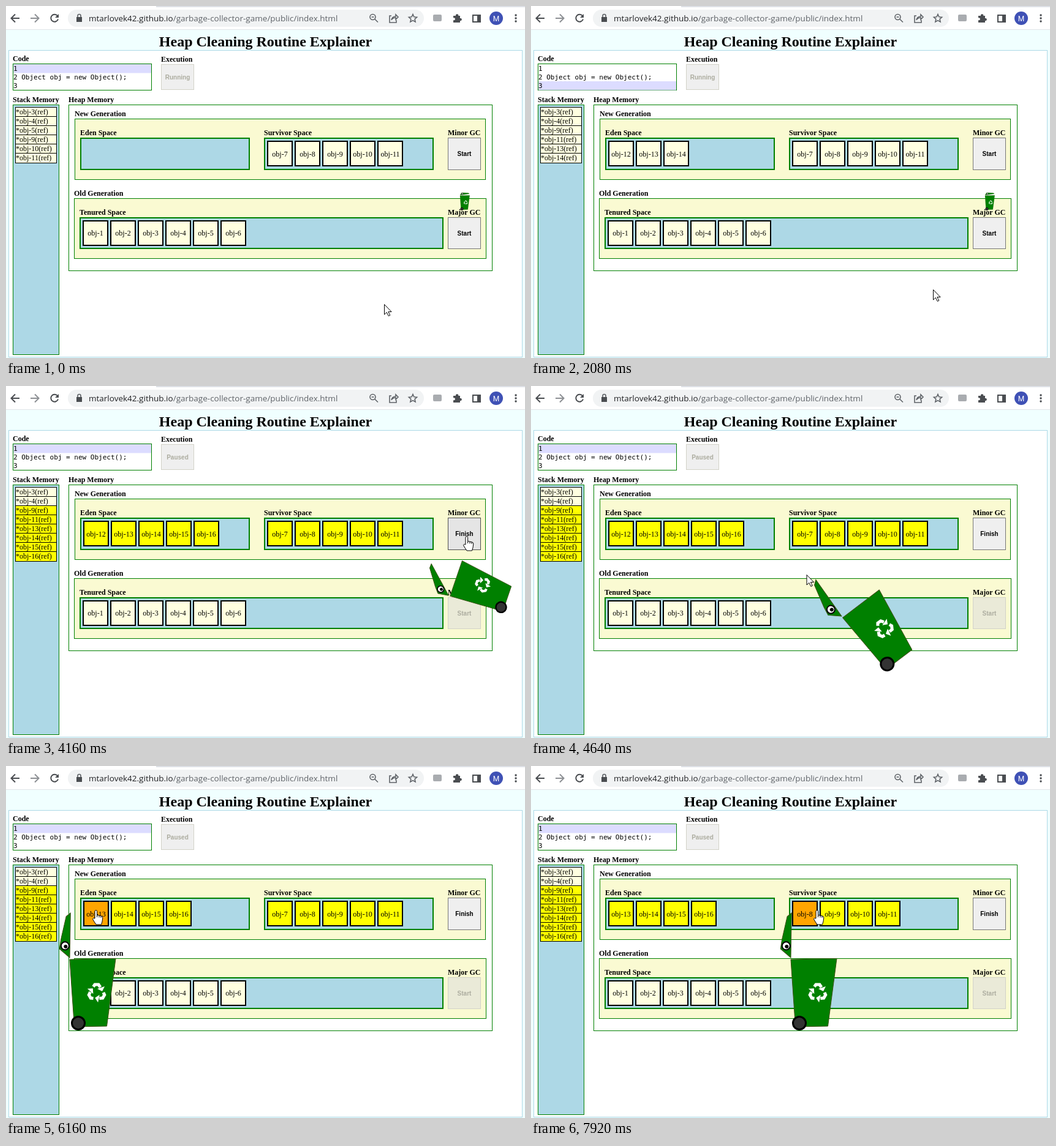
Recreate the animation shown at these times as an HTML page. Size 847 by 575 pixels, loop 8 s.

```html
<!DOCTYPE html>
<html lang="en">
<head>
<meta charset="utf-8">
<title>Heap Cleaning Routine Explainer</title>
<style>
html, body { margin: 0; width: 100%; height: 100%; overflow: hidden; background: #f0ffff; }
svg { display: block; }
text { font: 12px "Liberation Serif", serif; white-space: pre; }
.label { font-weight: bold; }
.title { font-size: 24px; font-weight: bold; text-anchor: middle; }
.code { font: 11px "DejaVu Sans Mono", monospace; }
.button { font: bold 10px "Liberation Sans", sans-serif; text-anchor: middle; }
.url { font: 13.5px "Open Sans", sans-serif; }
.cell { text-anchor: middle; }
.icon { fill: none; stroke: #5f6368; stroke-width: 1.6; }
.nav { fill: none; stroke: #4a4d51; stroke-width: 2; }
.faint { stroke: #8d9094; }
</style>
</head>
<body>
<svg id="stage" width="847" height="575" viewBox="0 0 847 575">
  <g id="page"></g>
  <g id="live"></g>
</svg>
<script>
const LOOP = 8000, STEP = 80;
const FIRST = 130, CYCLE = 815;   // the code loop makes one object per cycle
const PAUSE = 3840;               // minor collection begins
const EATEN = { 12: 5280, 7: 7920 };
const LOST = [5, 10, 12];         // one reference is dropped per cycle
const page = document.getElementById('page'), live = document.getElementById('live');

const clamp = u => Math.max(0, Math.min(1, u));
const smooth = u => (u = clamp(u), u * u * (3 - 2 * u));
const range = (a, b) => Array.from({ length: Math.max(0, b - a + 1) }, (_, i) => a + i);

// Rectangle given by its outer edges, with the border drawn inside
const box = (x, y, x2, y2, fill, line = 'none', w = 1) => {
  const b = line === 'none' ? 0 : w;
  return `<rect x="${x + b / 2}" y="${y + b / 2}" width="${x2 - x - b}" height="${y2 - y - b}" fill="${fill}" stroke="${line}" stroke-width="${b}"/>`;
};
const text = (x, y, s, cls = '', fill = '#000') =>
  `<text x="${x}" y="${y}" class="${cls}" fill="${fill}">${s}</text>`;
const path = (d, attrs = 'class="icon"') => `<path d="${d}" ${attrs}/>`;
const area = (label, x, y, x2, y2, fill, w = 1) =>
  text(x, y - 4, label, 'label') + box(x, y, x2, y2, fill, 'green', w);

function drawPage() {
  page.innerHTML =
    box(0, 0, 847, 38, '#fff') + box(245, 0, 847, 2, '#dee1e6') + box(0, 38, 847, 39, '#e2e5e8') +
    '<rect x="101" y="6" width="581" height="28" rx="14" fill="#f1f3f4"/>' +
    path('M22 20H9M15 13.5L8.5 20L15 26.5', 'class="nav"') +
    path('M40 20H53M47 13.5L53.5 20L47 26.5', 'class="nav faint"') +
    path('M84 16A6 6 0 1 0 85 21.5', 'class="nav"') + path('M86 13V19H80Z', 'fill="#4a4d51"') +
    box(115, 18, 124, 26, '#4a4d51') + path('M117 18V16a2.5 2.5 0 0 1 5 0V18') +
    text(135, 25, 'mtarlovek42.github.io<tspan fill="#5f6368">/garbage-collector-game/public/index.html</tspan>', 'url', '#202124') +
    '<circle class="icon" cx="598.5" cy="18" r="4.5"/>' + path('M602 21.5L607 26.5M596.5 18H600.5') +
    path('M629 16H626V27H637V23M629 23Q630 17 636 17V14L640 18L636 22V19Q631 19 629 23Z') +
    path('M664 13.5l1.9 4.3 4.7.5-3.5 3.1 1 4.6-4.1-2.4-4.1 2.4 1-4.6-3.5-3.1 4.7-.5z') +
    '<rect x="697" y="14" width="14" height="11" rx="2" fill="#a9acb0"/>' +
    path('M730 16H734a2.2 2.2 0 1 1 4.3 0H741V20a2.2 2.2 0 1 1 0 4.2V27H730V23a2 2 0 1 0 0-3.5Z', 'fill="#4a4d51"') +
    box(761, 14, 775, 27, '#fff', '#4a4d51', 2) + box(769, 14, 775, 27, '#4a4d51') +
    '<circle cx="800" cy="20" r="11" fill="#3f51b5"/>' +
    '<text x="800" y="24.5" text-anchor="middle" fill="#fff" style="font:12px Roboto,sans-serif">M</text>' +
    [15, 20, 25].map(y => `<circle cx="832" cy="${y}" r="1.7" fill="#4a4d51"/>`).join('') +
    text(423.5, 66, 'Heap Cleaning Routine Explainer', 'title') +
    box(4, 72, 843, 574, '#fff', 'lightblue') +
    area('Code', 11, 94, 238, 138, '#fff') +
    area('Stack Memory', 11, 161, 87, 570, 'lightblue') +
    area('Heap Memory', 102, 161, 794, 433, '#fff') +
    area('New Generation', 112, 184, 783, 284, '#fafad2') +
    area('Eden Space', 121, 215, 398, 268, 'lightblue', 2) +
    area('Survivor Space', 421, 215, 698, 268, 'lightblue', 2) +
    area('Old Generation', 111, 314, 784, 413, '#fafad2') +
    area('Tenured Space', 120, 345, 714, 397, 'lightblue', 2);
}

// Pointer moves: start, end, x, y, sag of the path
const moves = [
  [80, 440, 656, 463, 0], [2160, 2640, 661, 446, 0], [2960, 3120, 662, 431, 0], [3360, 3740, 752, 248, 0],
  [4240, 5040, 147, 238, 65], [6300, 6880, 296, 243, 4], [6900, 7800, 467, 238, 10]
];
function pointer(t) {
  let x = 617, y = 487;
  for (const [from, to, nx, ny, sag] of moves) {
    const u = smooth((t - from) / (to - from));
    x += (nx - x) * u;
    y += (ny - y) * u + sag * Math.sin(Math.PI * u);
  }
  return [x, y];
}

function button(label, name, x, y, h, enabled, over) {
  const fill = !enabled ? (x > 700 ? '#eaead8' : '#efefef') : over ? '#e5e5e5' : '#efefef';
  const line = !enabled ? '#d2d2c8' : over ? '#4f4f4f' : '#767676';
  return text(x, y - 4, label, 'label') + box(x, y, x + 54, y + h, fill, line) +
    text(x + 27, y + Math.floor(h / 2) + 4, name, 'button', enabled ? '#000' : '#acac9f');
}

// The bin grows out of its dock, then trails the pointer and snaps its lid
function bin(t) {
  const [px, py] = pointer(Math.max(t, PAUSE) - 90), age = t - PAUSE;
  const grow = clamp(age / 420), leave = grow * grow;
  const x = px - 11 - 32 * leave, y = py + 61 + 14 * leave + 26 * Math.sin(Math.PI * leave);
  const tilt = -70 * clamp(age / 320) * (1 - smooth((age - 360) / 900));
  let lid = 8 + 81 * smooth(age / 640);
  for (const bite of Object.values(EATEN))
    if (t >= bite && t < bite + 480) lid *= Math.abs(Math.cos(Math.PI * (t - bite) / 480));

  const arrow = path('M-5.5-9.5L-3-13H3L6-8.500', 'fill="none" stroke="#fff" stroke-width="5"') +
    path('M13-10L9-2L1-6Z', 'fill="#fff"');
  return `<g transform="translate(${x} ${y}) rotate(${tilt}) scale(${.21 + .79 * grow})">` +
    path('M0 3L75 1.5L60.5 112L7.500 113Z', 'fill="green" stroke="#3d4f12"') +
    '<circle cx="14" cy="107" r="10.5" fill="#333" stroke="#000" stroke-width="3"/>' +
    '<g transform="translate(44 57)">' +
    [0, 120, 240].map(a => `<g transform="rotate(${a})">${arrow}</g>`).join('') + '</g>' +
    `<g transform="rotate(${-lid})">` +
    path('M0 0L14-17L29-15L67-7L73 0Z', 'fill="green" stroke="#3d4f12"') +
    '<circle cx="19" cy="-8" r="6.5" fill="#fff" stroke="#000" stroke-width="2"/>' +
    '<circle cx="18" cy="-7" r="3"/></g></g>';
}

function draw(t) {
  const [mx, my] = pointer(t), paused = t >= PAUSE;
  const inside = (x, y, w, h) => mx >= x && mx <= x + w && my >= y && my <= y + h;
  const cycles = Math.floor((Math.min(t, PAUSE) - FIRST) / CYCLE) + 1;
  const phase = t - FIRST - (cycles - 1) * CYCLE;
  const row = paused || phase >= 510 ? 1 : phase < 250 ? 2 : 3;
  const made = range(12, 11 + cycles);
  const gone = LOST.slice(0, cycles);
  const refs = [3, 4, 5, 9, 10, 11, ...made].filter(n => !gone.includes(n));
  const onMinor = inside(721, 215, 54, 53);
  let hand = onMinor;

  const cells = (list, x, y, young) => list.filter(n => !(t >= EATEN[n])).map((n, i) => {
    const left = x + 45 * i, over = paused && young && inside(left, y, 42, 42);
    hand ||= over;
    const fill = over ? 'orange' : paused && young ? 'yellow' : 'lightyellow';
    return box(left, y, left + 42, y + 42, fill, '#000', 2) + text(left + 21, y + 26 - !young, 'obj-' + n, 'cell');
  }).join('');

  let s = box(12, 81 + 14 * row, 237, 95.5 + 14 * row, '#dcdcff') +
    ['1', '2 Object obj = new Object();', '3'].map((c, i) => text(12, 106 + 14 * i, c, 'code')).join('');
  s += refs.map((n, i) => {
    const y = 165 + 15 * i, asked = n === 13 && t >= 5680 && t < 6160;
    const fill = asked ? 'orange' : paused && n > 6 ? 'yellow' : 'lightyellow';
    return box(15, y, 83, y + 17, fill, '#000') + text(16, y + 12, `*obj-${n}(ref)`);
  }).join('');
  s += cells(made, 126, 220, true) + cells(range(7, 11), 426, 220, true) + cells(range(1, 6), 125, 350, false);
  s += button('Execution', paused ? 'Paused' : 'Running', 253, 95, 42, false) +
    button('Minor GC', paused ? 'Finish' : 'Start', 721, 215, 53, true, onMinor) +
    button('Major GC', 'Start', 721, 345, 52, !paused);
  s += bin(t);
  s += `<g transform="translate(${mx} ${my})" fill="#fff" stroke="#000">` + (hand
    ? path('M-2 11V-.5a1.8 1.8 0 0 1 3.6 0V5.5l7 1.5q2.3.6 2.2 3L10 16L8.5 21H0L-4.5 14q-2-3 0-3.5zM1.6 5.5V9M5 6.3V9.5M8 7V10', '')
    : path('M.5.5V17l3.8-3.6 3 6 2.5-1.2-2.9-5.7h5.2z', '')) + '</g>';
  live.innerHTML = s;
}

let last = -1;
function tick(now) {
  const t = Math.floor(now % LOOP / STEP) * STEP;
  if (t !== last) draw(last = t);
  requestAnimationFrame(tick);
}
drawPage();
draw(0);
requestAnimationFrame(tick);
</script>
</body>
</html>
```
